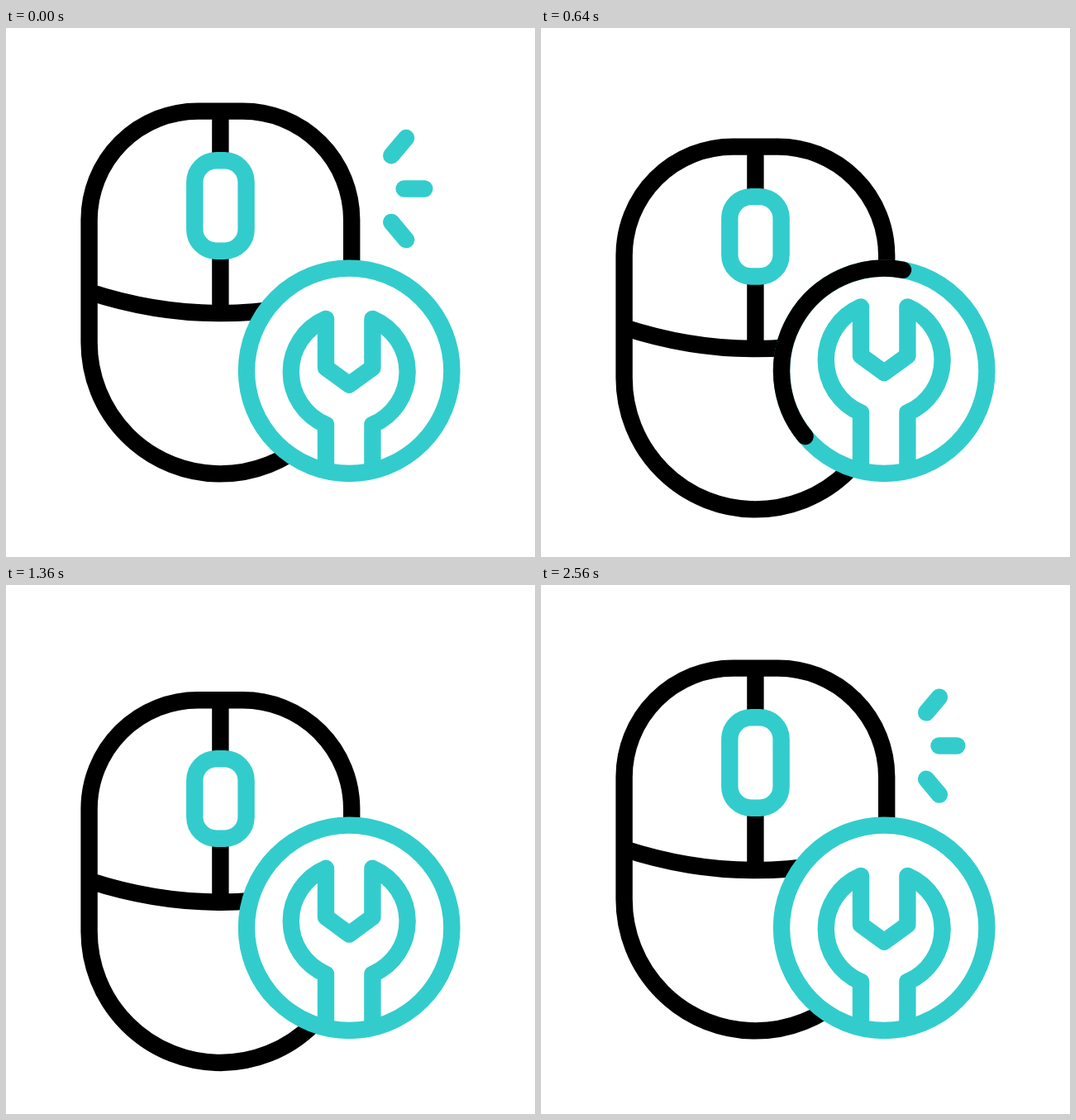
An HTML page for the animation above (2.6 s loop, 640 by 640 pixels).

```html
<!DOCTYPE html>
<html lang="en">
<head>
<meta charset="utf-8">
<title>Mouse repair</title>
<style>
  html, body { margin: 0; width: 100%; height: 100%; overflow: hidden; background: #fff; }
  svg { display: block; width: 100%; height: 100%; }
  .line { fill: none; stroke-width: 20.4; stroke-linejoin: round; }
  .ink { stroke: #000; }
  .teal { stroke: #3cc; }
  .round { stroke-linecap: round; }
  .white { fill: #fff; }
</style>
</head>
<body>
<svg viewBox="0 0 640 640">
  <defs>
    <clipPath id="disc"><circle cx="415.2" cy="414.8" r="124"/></clipPath>
  </defs>
  <g id="mouse">
    <path class="line ink" d="M100.6 232A131.6 131.6 0 0 1 232.2 100.6H286.6A131.6 131.6 0 0 1 418.2 232V380.6A158.8 158.8 0 0 1 100.6 380.6Z"/>
    <path class="line ink" d="M100.6 319.2Q259.4 371 418.2 319.2M259.4 100.6V345"/>
    <rect id="wheel" class="line teal white" x="228.3" width="62.3" rx="26"/>
  </g>
  <g id="rays" class="line teal round">
    <path/><path/><path/>
  </g>
  <circle class="white" cx="415.2" cy="414.8" r="124"/>
  <g clip-path="url(#disc)">
    <path id="wrench" class="line teal" d="M387 620V480A69.6 69.6 0 0 1 387 352V411L415.2 431.6L443.4 411V352A69.6 69.6 0 0 1 443.4 480V620"/>
  </g>
  <circle class="line teal" cx="415.2" cy="414.8" r="124.2"/>
  <path id="sweep" class="line ink round"/>
</svg>
<script>
const LOOP = 2600;
const CX = 415.2, CY = 414.8, R = 124.2;
const $ = id => document.getElementById(id);
const rays = [...$("rays").children];

// Progress from 0 to 1 between two times, even or eased.
const ramp = (t, from, to) => Math.min(1, Math.max(0, (t - from) / (to - from)));
function ease(t, from, to) {
  const p = ramp(t, from, to);
  const soft = p * p * (3 - 2 * p);
  const softer = p * p * p * (10 + p * (6 * p - 15));
  return soft + (softer - soft) * 0.25;
}

const shift = (id, y) => $(id).setAttribute("transform", `translate(0 ${y})`);

// The mouse bounces down, up, down and settles.
function drawMouse(t) {
  shift("mouse", 64 * ease(t, 0, 420) - 102 * ease(t, 520, 920)
    + 76.6 * ease(t, 920, 1360) - 38.6 * ease(t, 1360, 1880));
}

// The wheel rolls up and down, shorter while it moves.
function drawWheel(t) {
  const roll = ease(t, 440, 840) - ease(t, 840, 1220) + ease(t, 1220, 1600);
  const settle = ease(t, 1600, 2040);
  const y = 215 + 20.5 * ease(t, 0, 440) - 52 * roll + 31.5 * settle;
  const h = 109.4 - 13 * (ease(t, 0, 440) - settle);
  $("wheel").setAttribute("y", y - h / 2);
  $("wheel").setAttribute("height", h);
}

function drawWrench(t) {
  const jump = ease(t, 0, 440) - ease(t, 440, 860);
  const hold = ease(t, 900, 1140) - ease(t, 1880, 2040);
  shift("wrench", -27.2 * jump - 9.2 * hold);
}

// Head and tail count whole passes along a ray; the rays differ only in slope.
function drawRays(t) {
  const head = 1 + ramp(t, 770, 1070) + ramp(t, 2280, 2600);
  const tail = ramp(t, 0, 200) + ramp(t, 1040, 1230);
  const pass = Math.floor(tail);
  $("rays").style.display = head - tail > 0.002 ? "" : "none";
  rays.forEach((ray, i) => {
    const side = i - 1;
    const point = p => side
      ? `${466.1 + 18 * p} ${194.6 + side * (40.2 + 21.4 * p)}`
      : `${481.5 + 24.8 * p} 194.5`;
    ray.setAttribute("d", `M${point(tail - pass)}L${point(head - pass)}`);
  });
}

// The trimmed arc runs counter-clockwise from the right while its origin turns once.
function drawSweep(t) {
  const turn = ease(t, 0, 1125);
  const span = ease(t, 0, 465) - turn;
  const point = turns => {
    const a = -turns * 2 * Math.PI;
    return `${CX + R * Math.cos(a)} ${CY + R * Math.sin(a)}`;
  };
  $("sweep").setAttribute("d", span < 0.0005 ? "" :
    `M${point(2 * turn)}A${R} ${R} 0 ${+(span > 0.5)} 0 ${point(2 * turn + span)}`);
}

const parts = [drawMouse, drawWheel, drawWrench, drawRays, drawSweep];
const begin = performance.now();
function tick() {
  const t = (performance.now() - begin) % LOOP;
  parts.forEach(part => part(t));
  requestAnimationFrame(tick);
}
tick();
</script>
</body>
</html>
```
